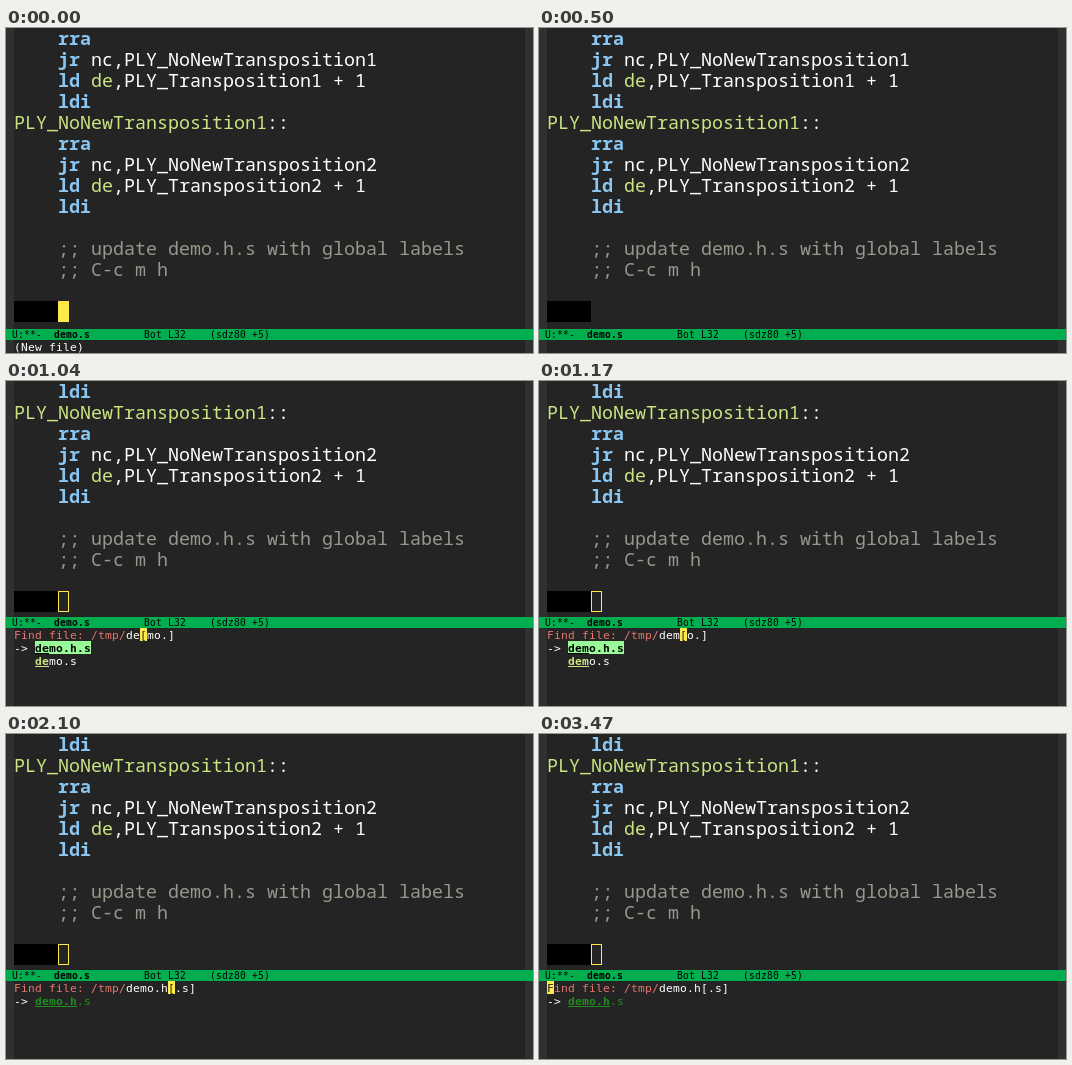
An HTML page with a canvas for the animation above (8 s loop, 527 by 325 pixels).

```html
<!DOCTYPE html>
<html lang="en">
<head>
<meta charset="utf-8">
<title>Editor session</title>
<style>
html, body { margin: 0; width: 100%; height: 100%; overflow: hidden; background: #242424; }
canvas { display: block; width: 527px; height: 325px; }
</style>
</head>
<body>
<canvas id="stage" width="527" height="325"></canvas>
<script>
const W = 527, H = 325, LOOP = 8000;
const ctx = document.getElementById('stage').getContext('2d', { alpha: false });

const color = {
  bg: '#242424', fringe: '#303030', text: '#ffffff', op: '#8ac6f2', name: '#cae682',
  comment: '#99968b', prompt: '#e5786d', bar: '#00ae50', cursor: '#ffe84a',
  pick: '#98fb98', only: '#228b22', dir: '#ff0000'
};

// Character cells: advance, font size, regular weight, family
const code = { adv: 11, size: 18.33, weight: 500, family: '"Noto Sans Mono", monospace' };
const mini = { adv: 7, size: 11.3, weight: 400, family: '"DejaVu Sans Mono", monospace' };
const mode = { adv: 6, size: 9.6, weight: 400, family: '"DejaVu Sans Mono", monospace' };
const ROW = 21, MINI_ROW = 13, LEFT = 8;

function rect(fill, x, y, w, h) {
  ctx.fillStyle = fill;
  ctx.fillRect(x, y, w, h);
}

// Draws on the character grid and returns the x after the last cell.
function write(face, str, x, base, fill, bold) {
  ctx.font = `${bold ? 700 : face.weight} ${face.size}px ${face.family}`;
  ctx.fillStyle = fill;
  for (const ch of str) {
    if (ch !== ' ') ctx.fillText(ch, x, base);
    x += face.adv;
  }
  return x;
}

const op = s => [s, color.op, true];
const plain = s => [s, color.text];
const note = s => [[s, color.comment]];
const jump = n => [op('jr'), plain(` nc,PLY_NoNewTransposition${n}`)];
const load = n => [op('ld'), plain(' '), ['de', color.name], plain(`,PLY_Transposition${n} + 1`)];

const listing = [
  [op('rra')], jump(1), load(1), [op('ldi')],
  [['PLY_NoNewTransposition1', color.name], plain('::')],
  [op('rra')], jump(2), load(2), [op('ldi')],
  [],
  note(';; update demo.h.s with global labels'),
  note(';; C-c m h'),
  []
];
const LABEL_ROW = 4;

function drawCode(scroll, cursor) {
  listing.forEach((line, i) => {
    let x = i === LABEL_ROW ? LEFT : LEFT + 4 * code.adv;
    for (const [str, fill, bold] of line)
      x = write(code, str, x, (i - scroll) * ROW + 17, fill, bold);
  });
  const y = (listing.length - scroll) * ROW;
  rect('#000', LEFT, y, 44, ROW);
  if (cursor === 'solid') rect(color.cursor, 52, y, 11, ROW);
  if (cursor === 'hollow') {
    ctx.strokeStyle = color.cursor;
    ctx.lineWidth = 1;
    ctx.strokeRect(52.5, y + 0.5, 10, ROW - 1);
  }
}

function drawBar(y) {
  rect(color.bar, 0, y, W, 11);
  write(mode, 'U:**-', 6, y + 9, '#000');
  write(mode, 'demo.s', 48, y + 9, '#000', true);
  write(mode, 'Bot L32', 138, y + 9, '#000');
  write(mode, '(sdz80 +5)', 204, y + 9, '#000');
}

const miniTop = row => 247 + row * MINI_ROW;
const miniBase = row => miniTop(row) + 11;

// Candidate with its typed part bold and underlined
function candidate(str, typed, row, matchFill, fill, bold) {
  const x = 29, base = miniBase(row);
  const end = write(mini, str.slice(0, typed), x, base, matchFill, true);
  write(mini, str.slice(typed), end, base, fill, bold);
  rect(matchFill, x, base + 1, end - x, 1);
}

function wrapArrow(x, y, flip) {
  ctx.save();
  ctx.translate(x, y);
  if (flip) { ctx.translate(8, 0); ctx.scale(-1, 1); }
  ctx.strokeStyle = ctx.fillStyle = color.text;
  ctx.lineWidth = 2;
  ctx.beginPath();
  ctx.moveTo(6, 1);
  ctx.lineTo(3, 1);
  ctx.quadraticCurveTo(1, 1.5, 1, 3.5);
  ctx.quadraticCurveTo(1.5, 5, 4, 5);
  ctx.stroke();
  ctx.beginPath();
  ctx.moveTo(6, 3);
  ctx.lineTo(6, 8);
  ctx.lineTo(1, 8);
  ctx.fill();
  ctx.restore();
}

function drawPrompt({ typed, hint = '', home }) {
  const label = 'Find file: ';
  let x = write(mini, label + '/tmp/', LEFT, miniBase(0), color.prompt);
  x = write(mini, typed, x, miniBase(0), color.text);
  write(mini, hint, x, miniBase(0), color.text);
  const cx = home ? LEFT : x;
  rect(color.cursor, cx, miniTop(0), mini.adv, MINI_ROW);
  write(mini, home ? label[0] : hint.slice(0, 1), cx, miniBase(0), color.bg);

  const n = typed.length;
  write(mini, '->', LEFT, miniBase(1), color.text);
  if (n > 5) {
    candidate('demo.h.s', n, 1, color.only, color.only);
    return;
  }
  rect(color.pick, 29, miniTop(1), 56, MINI_ROW);
  candidate('demo.h.s', n, 1, '#000', '#000', true);
  candidate('demo.s', n, 2, color.name, color.text);
  if (n > 1) return;
  write(mini, 'systemd-private-537bfc72717b4bcfbfafb58152aba3aa-rtkit-daemon.service-',
    29, miniBase(3), color.dir);
  write(mini, '02txza/', LEFT, miniBase(4), color.dir);
  write(mini, 'Temp-2ad87184-c4c9-482b-8a79-02b42d883c0a/', 29, miniBase(5), color.dir);
  wrapArrow(519, miniTop(3) + 2, true);
  wrapArrow(0, miniTop(4) + 2, false);
}

const steps = [
  { at: 0, message: '(New file)', cursor: 'solid' },
  { at: 500 },
  { at: 850, typed: 'd' },
  { at: 1040, typed: 'de', hint: '[mo.]' },
  { at: 1170, typed: 'dem', hint: '[o.]' },
  { at: 1410, typed: 'demo', hint: '[.]' },
  { at: 1770, typed: 'demo.' },
  { at: 2100, typed: 'demo.h', hint: '[.s]' },
  { at: 3470, typed: 'demo.h', hint: '[.s]', home: true }
];

function draw(t) {
  const step = steps.filter(s => s.at <= t).pop();
  rect(color.bg, 0, 0, W, H);
  rect(color.fringe, 0, 0, 8, H);
  rect(color.fringe, 519, 0, 8, H);
  if (step.typed) {
    drawCode(3, 'hollow');
    drawBar(236);
    drawPrompt(step);
  } else {
    drawCode(0, step.cursor);
    drawBar(301);
    write(mini, step.message || '', LEFT, 323, color.text);
  }
}

const start = performance.now();
function tick() {
  draw((performance.now() - start) % LOOP);
  requestAnimationFrame(tick);
}
tick();
</script>
</body>
</html>
```
